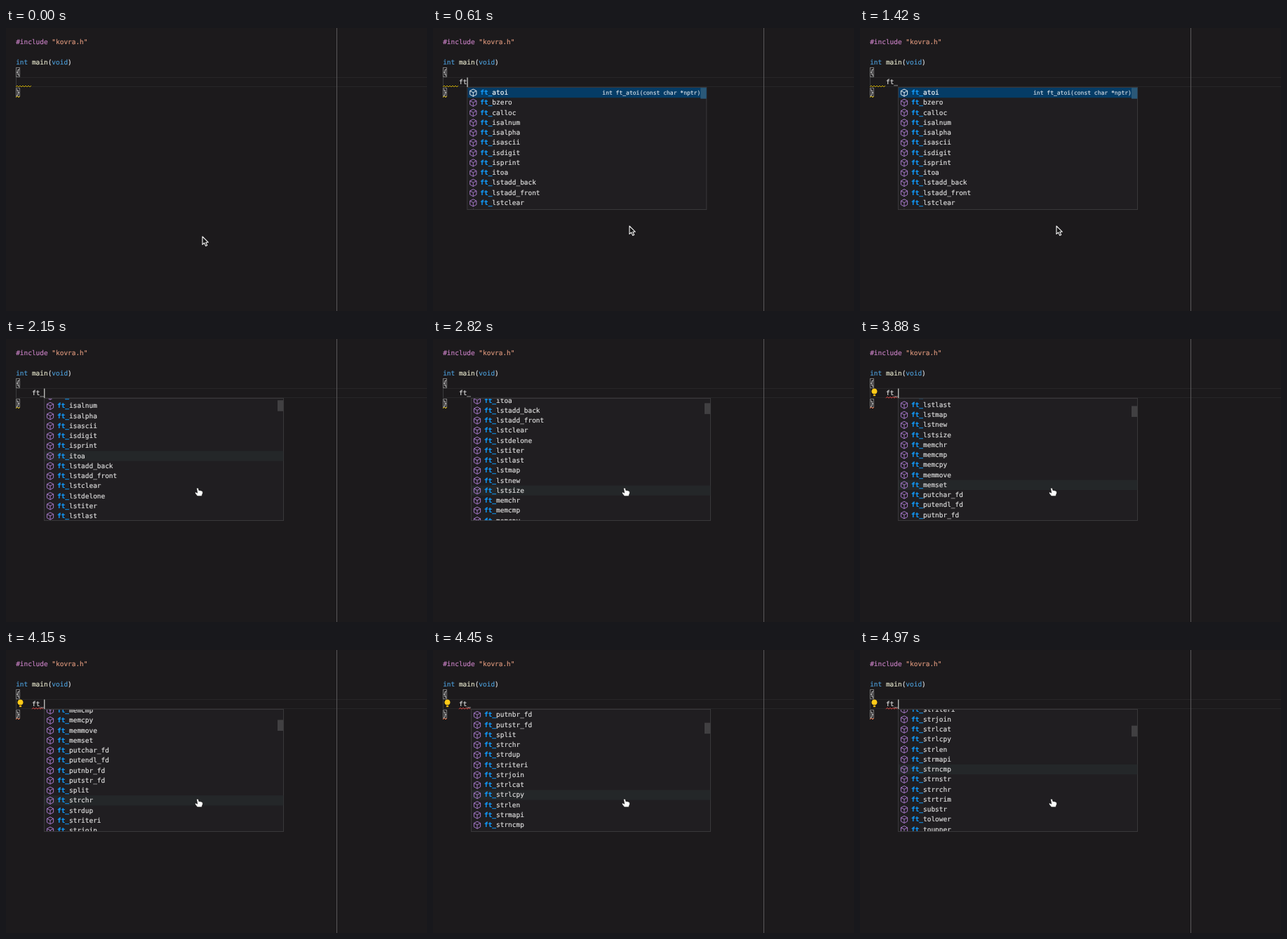
These frames come from a looping animation (600x403 px, 5 s). An HTML page:

```html
<!DOCTYPE html>
<html lang="en">
<head>
<meta charset="utf-8">
<title>Autocomplete</title>
<style>
  html, body { margin: 0; width: 100%; height: 100%; overflow: hidden; background: #1c1a1c; }
  svg { display: block; width: 600px; height: 403px; }
  text {
    font: 9.45px "DejaVu Sans Mono", monospace; white-space: pre;
    text-rendering: geometricPrecision;
    color: #e2e2e2;
  }
  text, tspan { fill: currentColor; stroke: currentColor; stroke-width: .16; }
  .match { color: #1299f8; font-weight: bold; }
  .macro { color: #c880c4; }
  .str { color: #dc977c; }
  .type { color: #4b9cd6; }
  .func { color: #e6e6cc; }
  .line { fill: none; stroke-width: 1; }
  .icon { fill: none; stroke: #b180d7; stroke-width: .9; stroke-linejoin: round; }
  .picked text { color: #fff; }
  .picked .icon { stroke: #fff; }
  .picked .detail { font-size: 8.03px; color: #d5dde5; }
</style>
</head>
<body>
<svg viewBox="0 0 600 403">
  <defs>
    <clipPath id="view"><rect x="55" y="85" width="340.5" height="173"/></clipPath>
    <path id="cube" d="M0-5L4.6-2.6V2.7L0 5.2L-4.6 2.7V-2.6ZM-4.6-2.6L0-.2L4.6-2.6M0-.2V5.2"/>
  </defs>
  <rect width="600" height="403" fill="#1c1a1c"/>
  <path class="line" stroke="#272628" d="M14 70.5H600M14 83.5H600"/>
  <path class="line" stroke="#3c3b3d" d="M14.5 70V84"/>
  <path class="line" stroke="#59585a" d="M471.5 0V403"/>
  <g class="line" stroke="#7c7c7c">
    <rect x="14.5" y="56.5" width="5" height="13"/>
    <rect x="14.5" y="85.5" width="5" height="12"/>
  </g>
  <path class="line" id="warning" stroke="#c6a700"/>
  <path class="line" id="error" stroke="#f04a45"/>
  <path class="line" id="braceMark"/>
  <text x="14.2" y="23.4"><tspan class="macro">#include</tspan> <tspan class="str">"kovra.h"</tspan></text>
  <text x="14.2" y="51.9"><tspan class="type">int</tspan> <tspan class="func">main</tspan>(<tspan class="type">void</tspan>)</text>
  <text x="14.2" y="66">{</text>
  <text x="37" y="80.2" id="typed"></text>
  <text x="14.2" y="94.5">}</text>
  <g id="bulb">
    <path fill="#ffca18" d="M20.5 70.6A4 4 0 0 0 18.6 78.1H22.4A4 4 0 0 0 20.5 70.6Z"/>
    <path fill="#e0b010" d="M18.9 78.7H22.1V81.2H18.9Z"/>
  </g>
  <rect id="caret" y="70.5" width="1.3" height="13.5" fill="#c4c4c2"/>

  <g id="popup">
    <rect x="54.5" y="84.5" width="341" height="174" fill="#201e21" stroke="#39383a"/>
    <g clip-path="url(#view)">
      <rect id="hover" x="55" width="340.5" height="14.25" fill="#242729"/>
      <g id="list"><rect x="55" y="85" width="340.5" height="14.25" fill="#053c66"/></g>
      <rect id="thumb" x="387" width="8.5" height="15.5"/>
    </g>
  </g>

  <path id="arrow" fill="#151515" stroke="#f4f4f4" stroke-width="1.1" stroke-linejoin="round"
    d="M0 0V11.4L2.7 9L4.6 13.4L6.7 12.5L4.8 8.2H8.2Z"/>
  <path id="hand" fill="#fff" stroke="#111" stroke-width=".7" stroke-linejoin="round"
    d="M-1.4 .4Q0-.4 1.2 .5L2 3.7Q3.2 2.9 4 4Q5.2 3.3 6 4.5Q7.5 4.4 7.5 6.2Q7.6 8.6 6.3 10.2V11.8H-.2L-3.3 8Q-4.3 6.4-2.6 6.1L-.3 7.2Z"/>
</svg>
<script>
const LOOP = 5000, ROW = 14.25, NOTCH = 39.55, CHAR = 5.69;
const KEYS = [340, 500, 825];
const WHEEL = [2110, 2440, 2660, 3150, 3390, 3985, 4080, 4165, 4320, 4610, 4940];
const names = `atoi bzero calloc isalnum isalpha isascii isdigit isprint itoa
  lstadd_back lstadd_front lstclear lstdelone lstiter lstlast lstmap lstnew lstsize
  memchr memcmp memcpy memmove memset putchar_fd putendl_fd putnbr_fd putstr_fd
  split strchr strdup striteri strjoin strlcat strlcpy strlen strmapi strncmp
  strnstr strrchr strtrim substr tolower toupper`.split(/\s+/);

const el = id => document.getElementById(id);
const set = (id, name, value) => el(id).setAttribute(name, value);
const show = (id, on) => set(id, "visibility", on ? "visible" : "hidden");
const move = (id, x, y) => set(id, "transform", `translate(${x} ${y})`);
const count = (times, t) => times.filter(time => time <= t).length;

function wave(x0, x1, y) {
  let d = `M${x0} ${y + 1}`;
  for (let x = x0 + 2, up = true; x <= x1; x += 2, up = !up) d += `L${x} ${up ? y - 1 : y + 1}`;
  return d;
}

function glide(t, start, end) {
  const p = Math.min(1, Math.max(0, (t - start) / (end - start)));
  return p * p * (3 - 2 * p);
}

el("list").innerHTML += names.map((name, i) => `
  <g class="${i ? "" : "picked"}" transform="translate(0 ${i * ROW})">
    <use href="#cube" class="icon" x="63" y="92.1"/>
    <text x="73" y="95.2"><tspan class="match">ft_</tspan>${name}</text>
    ${i ? "" : '<text class="detail" x="247" y="94.8">int ft_atoi(const char *nptr)</text>'}
  </g>`).join("");
set("warning", "d", wave(14, 37, 83));
set("error", "d", wave(37, 54, 83.2));
set("braceMark", "d", wave(14, 20, 98));

function draw(t) {
  const typed = count(KEYS, t);
  el("typed").textContent = "ft_".slice(0, typed);
  set("caret", "x", 37 + typed * CHAR);
  show("caret", t >= KEYS[0] && (t < KEYS[2] || (t - KEYS[2]) % 1000 < 500));

  const failed = t >= 2910;
  show("warning", t < 2060);
  show("error", failed);
  show("bulb", failed);
  set("braceMark", "stroke", failed ? "#d8663c" : "#c6a700");

  const rise = glide(t, 200, 440), reach = glide(t, 1450, 1790);
  const x = 280 - 7 * reach, y = 297 - 15 * rise - 70 * reach;
  const inside = y < 258;
  show("arrow", !inside);
  show("hand", inside);
  move("arrow", x, y);
  move("hand", x, y);

  // The hovered row catches up shortly after each wheel notch.
  const notches = count(WHEEL, t), scroll = notches * NOTCH;
  const row = Math.round((y - 92.3 + count(WHEEL, t - 60) * NOTCH) / ROW);
  show("popup", t >= 590);
  move("popup", (typed - KEYS.length) * CHAR, 0);
  move("list", 0, -scroll);
  show("hover", inside && t >= 590);
  set("hover", "y", 85 + row * ROW - scroll);
  set("thumb", "y", 85.2 + notches * 2.05);
  set("thumb", "fill", notches ? "#414042" : "#2a5878");
}

function tick(now) {
  draw(now % LOOP);
  requestAnimationFrame(tick);
}
draw(0);
requestAnimationFrame(tick);
</script>
</body>
</html>
```
